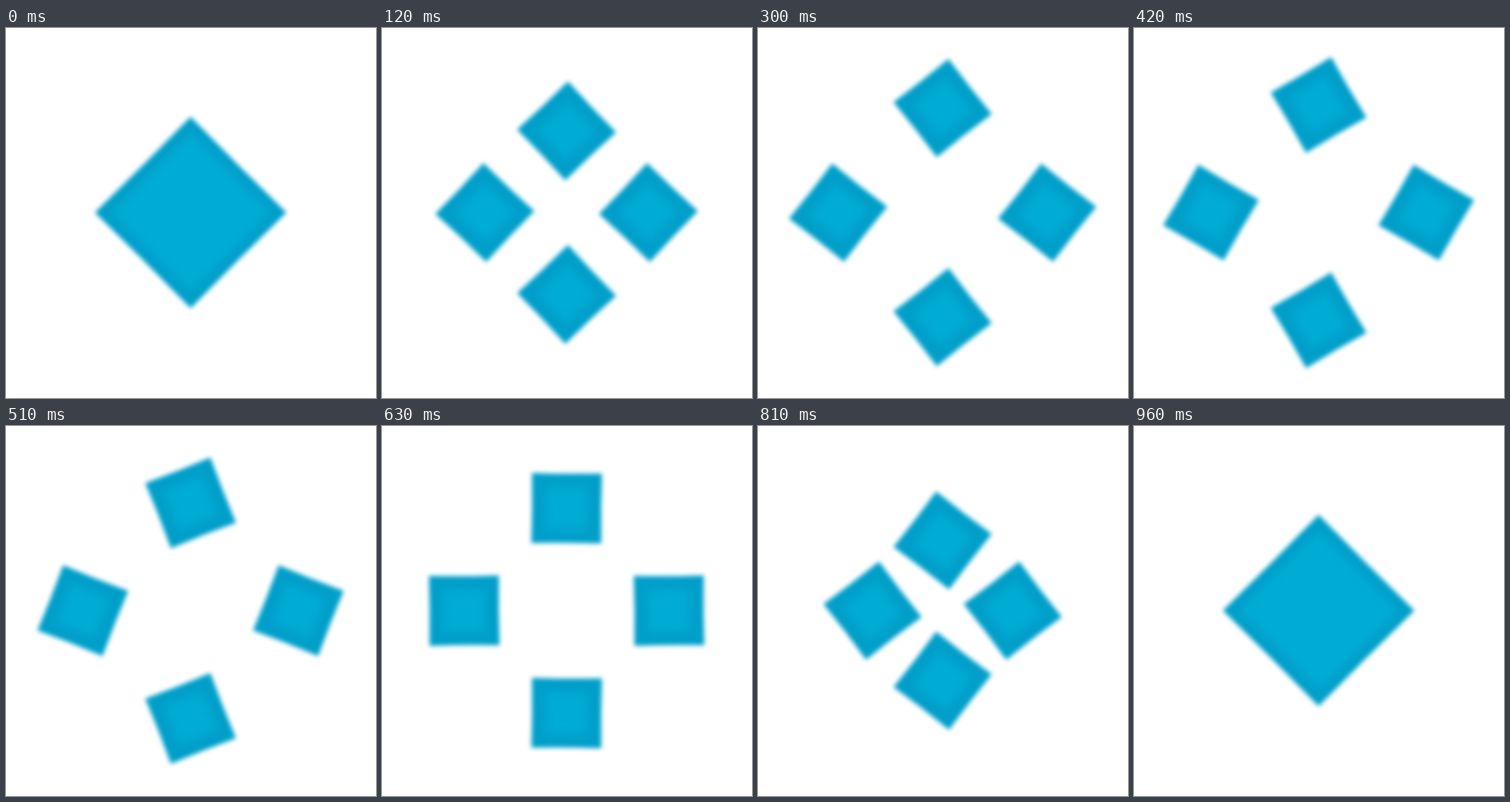
An HTML page with a canvas that plays this animation: 400 px wide and 400 px high, repeating every 990 ms.

```html
<!DOCTYPE html>
<html lang="en">
<head>
<meta charset="utf-8">
<title>Splitting diamond</title>
<style>
  html, body { margin: 0; width: 100%; height: 100%; overflow: hidden; background: #fff; }
  canvas { display: block; width: 400px; height: 400px; }
</style>
</head>
<body>
<canvas id="stage" width="400" height="400"></canvas>
<script>
const ctx = document.getElementById('stage').getContext('2d');
const LOOP = 990, STEP = 30, CENTER = 199.6;
const REST = 50, TRAVEL = 66.5;
const EDGE = '#009fca', CORE = '#00acd3';

// Turn in degrees at given times.
const TURN = [[0, 0], [120, 1.6], [300, 6.8], [510, 23.5], [630, 45.5], [810, 82.5], [960, 90]];

function turnAt(t) {
  if (t >= 960) return 90;
  const i = TURN.findIndex(([time]) => time > t) - 1;
  const slope = k => {
    if (k === 0 || k === TURN.length - 1) return 0;
    const [a, b] = [TURN[k - 1], TURN[k + 1]];
    return (b[1] - a[1]) / (b[0] - a[0]);
  };
  const [t0, a] = TURN[i], [t1, b] = TURN[i + 1];
  const d = t1 - t0, s = (t - t0) / d, s2 = s * s, s3 = s2 * s;
  return a + (b - a) * (3 * s2 - 2 * s3)
    + d * slope(i) * (s3 - 2 * s2 + s) + d * slope(i + 1) * (s3 - s2);
}

function offsetAt(t) {
  if (t >= 960) return REST;
  if (t < 480) return REST + TRAVEL * (1 - (1 - t / 480) ** 3);
  const phase = Math.max(0, t - 540) / 472;
  return REST + TRAVEL * (1 + Math.cos(Math.PI * phase)) / 2;
}

// Four-cornered path whose sides bend inwards by `pinch`.
function diamondPath(radius, pinch) {
  const bend = radius / 2 - pinch * Math.SQRT2;
  ctx.beginPath();
  ctx.moveTo(0, -radius);
  ctx.quadraticCurveTo(bend, -bend, radius, 0);
  ctx.quadraticCurveTo(bend, bend, 0, radius);
  ctx.quadraticCurveTo(-bend, bend, -radius, 0);
  ctx.quadraticCurveTo(-bend, -bend, 0, -radius);
}

function softFill(radius, pinch, color, blur) {
  ctx.filter = `blur(${blur}px)`;
  ctx.fillStyle = color;
  diamondPath(radius, pinch);
  ctx.fill();
  ctx.filter = 'none';
}

function diamond(x, y, degrees, radius, inset, pinch) {
  ctx.save();
  ctx.translate(CENTER + x, CENTER + y);
  ctx.rotate(degrees * Math.PI / 180);
  softFill(radius, pinch, EDGE, 2.6);
  softFill(radius - inset, 0, CORE, 5);
  ctx.restore();
}

function draw(t) {
  ctx.fillStyle = '#fff';
  ctx.fillRect(0, 0, 400, 400);
  const offset = offsetAt(t);
  if (offset <= REST) {
    diamond(0, 0, 0, 103.5, 18, 0.5);
    return;
  }
  // The vertical pair turns clockwise, the horizontal pair the other way.
  const turn = turnAt(t);
  for (const side of [-1, 1]) {
    diamond(0, side * offset, turn, 53.5, 22, 0.5);
    diamond(side * offset, 0, -turn, 53.5, 22, 0.5);
  }
}

function frame() {
  const t = performance.now() % LOOP;
  draw(Math.floor(t / STEP) * STEP);
  requestAnimationFrame(frame);
}
frame();
</script>
</body>
</html>
```
